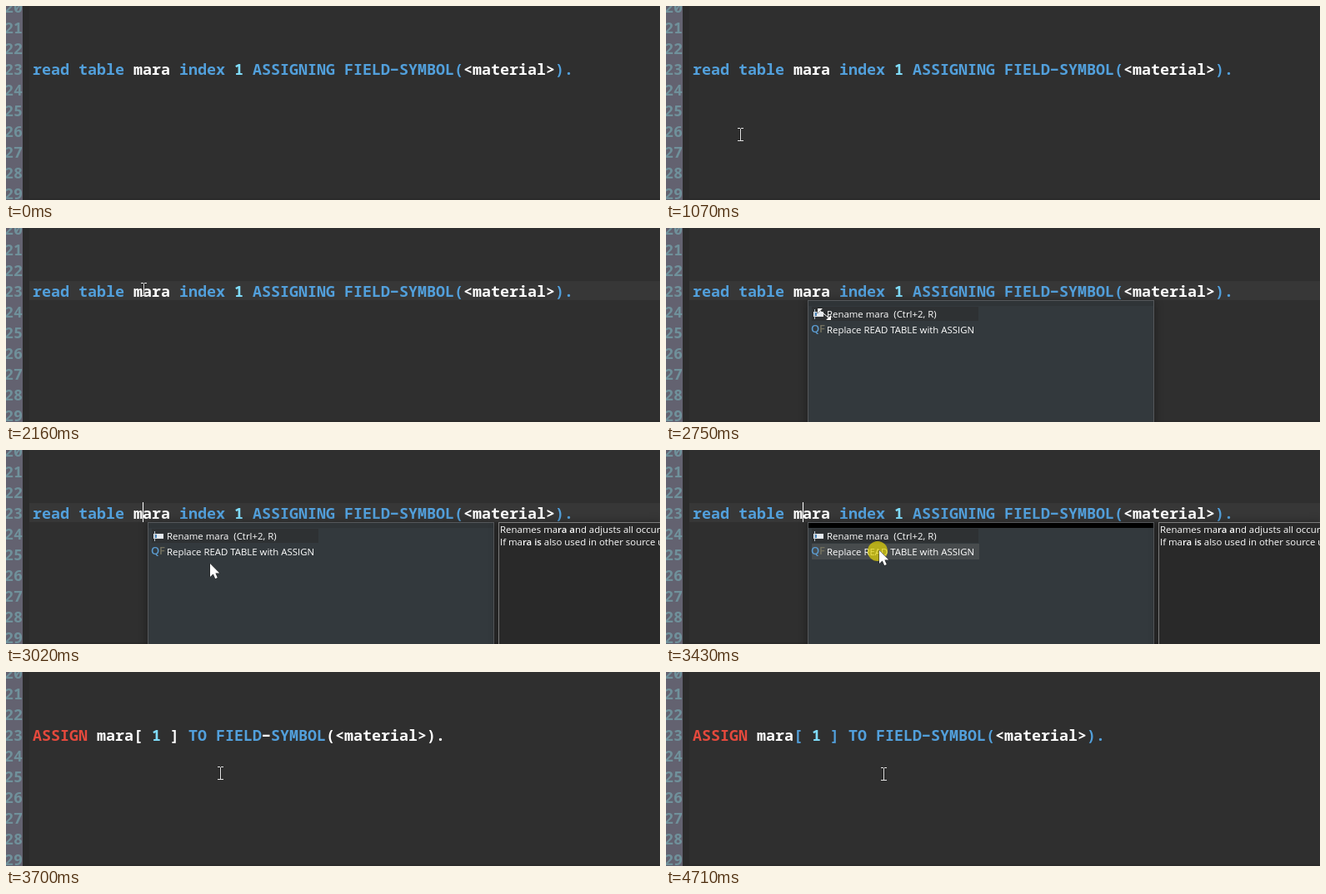
These frames come from a looping animation (785x234 px, 5.77 s). An HTML page with a canvas:

```html
<!DOCTYPE html>
<html lang="en">
<head>
<meta charset="utf-8">
<title>Quick fix in a code editor</title>
<style>
  html, body { margin: 0; width: 100%; height: 100%; overflow: hidden; background: #2f2f2f; }
  canvas { display: block; }
</style>
</head>
<body>
<canvas id="stage" width="785" height="234"></canvas>
<script>
const ctx = document.getElementById('stage').getContext('2d');
const W = 785, H = 234, LOOP = 5770;
const LEFT = 32, BASE = 83, CHAR = 11, LINE = 25;
const BLUE = '#52a0dc', WHITE = '#ffffff', CYAN = '#80dcfa', RED = '#e5493d';
const CODE = '600 18.33px "Noto Sans Mono", "DejaVu Sans Mono", monospace';
const UI = '11.4px "Open Sans", "Noto Sans", sans-serif';

const OLD_CODE = 'read table mara index 1 ASSIGNING FIELD-SYMBOL(<material>).';
const NEW_CODE = 'ASSIGN mara[ 1 ] TO FIELD-SYMBOL(<material>).';

const ARROW = new Path2D('M0 0V16L3.7 12.6L6.2 18.2L8.8 17L6.4 11.6L11.3 11.4Z');
const HEAD = new Path2D('M-8 -7H-2L-8 -1Z');

// Each stop: start, end, x, y
const START = [56, 192];
const STOPS = [
  [860, 1420, 160, 75],
  [1700, 1830, 165, 74],
  [2680, 2750, 190, 104],
  [2750, 3020, 245, 137],
  [3020, 3300, 256, 121],
  [3640, 3700, 257, 122],
  [4440, 4710, 261, 123]
];

const within = (t, a, b) => t >= a && t < b;

function box(x, y, w, h, color) {
  ctx.fillStyle = color;
  ctx.fillRect(x, y, w, h);
}

function text(str, x, y, color, font) {
  ctx.font = font;
  ctx.fillStyle = color;
  ctx.fillText(str, x, y);
  return x + ctx.measureText(str).width;
}

function tokenColor(token, mark) {
  if (token === 'ASSIGN') return RED;
  if (token === '1') return CYAN;
  if (/mara|</.test(token)) return WHITE;
  return /\w/.test(token) ? BLUE : mark;
}

function codeLine(code, mark) {
  for (const { 0: token, index } of code.matchAll(/<\w+>|\w+|[^\w\s<]/g)) {
    const glyphs = token.replace('-', '\u2212');
    text(glyphs, LEFT + index * CHAR, BASE, tokenColor(token, mark), CODE);
  }
}

function editor(t) {
  box(0, 0, W, H, '#2f2f2f');
  box(0, 0, 20, H, '#636270');
  box(20, 0, 8, H, '#2b2b2b');
  box(20, 232, W, 2, '#2a2a2a');
  for (let i = 0; i < 10; i++) text(20 + i, -2, 8 + i * LINE, '#70919b', CODE);
  if (within(t, 1980, 3640)) box(28, 64, W, 23, '#373737');
  if (t < 3640) codeLine(OLD_CODE, BLUE);
  else codeLine(NEW_CODE, t < 4530 ? WHITE : BLUE);
  if (within(t, 1900, 2160) || within(t, 2960, 3500)) box(164, 63, 1, 24, WHITE);
}

function panel(x, w, fill, border) {
  ctx.save();
  ctx.shadowColor = 'rgba(0,0,0,.35)';
  ctx.shadowBlur = 10;
  box(x, 87, w, H, border);
  ctx.restore();
  box(x + 1, 88, w - 2, H, fill);
}

function popup(t) {
  panel(170, 416, '#33393d', '#55585b');
  if (t < 2420) return;
  box(171, 88, 414, 6, t < 3430 ? '#2f3437' : '#000000');
  box(175, 95, 200, 17, '#2e3133');
  if (t >= 3180) box(175, 113, 201, 19, '#474b4d');

  box(177, 101, 12, 6, '#e4e8ec');
  box(179, 102, 2, 4, '#4a87bd');
  box(178, 98, 1, 12, '#b4bec7');
  text('Rename mara\u00a0 (Ctrl+2, R)', 193, 108, WHITE, UI);

  const icon = '600 13px "Open Sans", sans-serif';
  text('Q', 174, 126, '#5b9bd0', icon);
  text('F', 184, 126, '#747260', icon);
  text('Replace READ TABLE with ASSIGN', 193, 127, WHITE, UI);
}

function docs() {
  panel(591, 196, '#292929', '#7c7c7c');
  const lines = ['Renames ma*ra a*nd adjusts all occurrences', 'If ma*ra is* also used in other source units'];
  lines.forEach((line, row) => line.split('*').reduce((x, part, i) =>
    text(part, x, 100 + row * 15, WHITE, (i === 1 ? '600 ' : '') + UI), 593));
}

// The pointer is seen about every 70 ms
function ease(t, a, b) {
  const steps = Math.round((b - a) / 70);
  const p = Math.floor((t - a) / (b - a) * steps + 1e-6) / steps;
  const k = Math.max(0, Math.min(1, p));
  return k * k * (3 - 2 * k);
}

function pointer(t) {
  return STOPS.reduce(([x, y], [a, b, toX, toY]) => {
    const k = ease(t, a, b);
    return [x + (toX - x) * k, y + (toY - y) * k];
  }, START).map(Math.round);
}

function outlined(path) {
  ctx.fillStyle = WHITE;
  ctx.strokeStyle = '#1a1a1a';
  ctx.stroke(path);
  ctx.fill(path);
}

function iBeam() {
  box(-1, -7, 3, 15, 'rgba(0,0,0,.35)');
  box(0, -7, 1, 15, '#e6e6e6');
  for (const y of [-8, 7]) {
    box(-3, y, 3, 1, '#e6e6e6');
    box(1, y, 3, 1, '#e6e6e6');
  }
}

function resizeArrow() {
  for (let i = 0; i < 2; i++) {
    outlined(HEAD);
    box(-1, -1, 1, 1, WHITE);
    ctx.rotate(Math.PI);
  }
  ctx.strokeStyle = WHITE;
  ctx.stroke(new Path2D('M-5 -4L5 4'));
}

function cursor(t) {
  ctx.save();
  ctx.translate(...pointer(t));
  if (within(t, 2750, 2817)) resizeArrow();
  else if (within(t, 2817, 3640)) outlined(ARROW);
  else iBeam();
  ctx.restore();
}

function clickSpot(x, y, alpha) {
  ctx.beginPath();
  ctx.arc(x, y, 12, 0, 7);
  ctx.fillStyle = `rgba(226,210,8,${alpha})`;
  ctx.fill();
}

function draw(t) {
  editor(t);
  if (within(t, 2290, 3570)) popup(t);
  if (within(t, 2960, 3570)) docs();
  if (within(t, 1830, 1900)) clickSpot(162, 74, .6);
  if (within(t, 3430, 3500)) clickSpot(254, 122, .72);
  if (t >= 860) cursor(t);
}

function frame() {
  draw(performance.now() % LOOP);
  requestAnimationFrame(frame);
}
frame();
</script>
</body>
</html>
```
